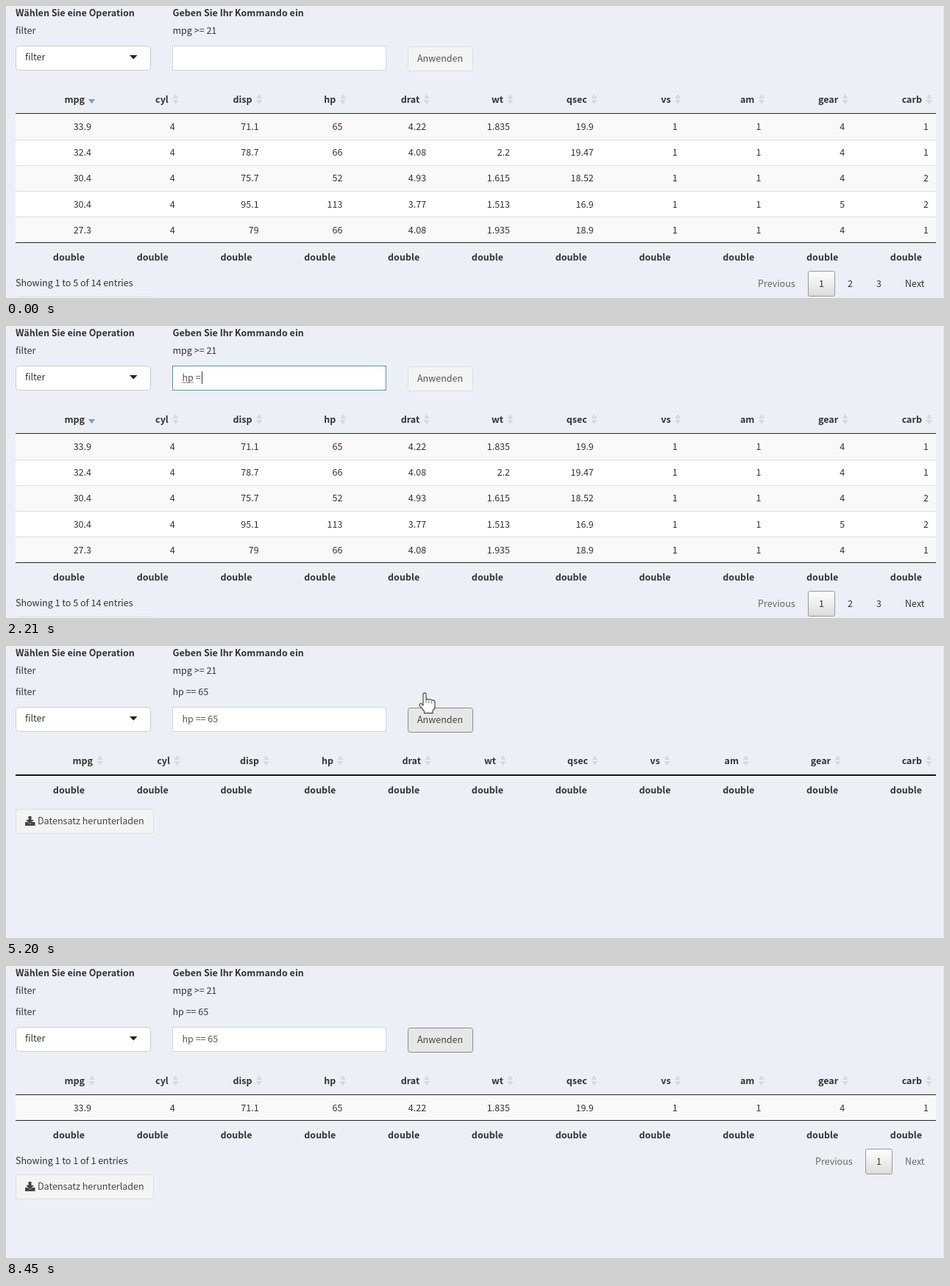
Write an HTML page that moves like this. It is 1275 by 398 pixels and loops after 8.58 s.

```html
<!DOCTYPE html>
<html lang="de">
<head>
<meta charset="utf-8">
<title>Tabelle filtern</title>
<style>
  html, body { margin: 0; width: 100%; height: 100%; overflow: hidden; background: #ecf0f6; }
  svg { display: block; }
  text {
    font: 12.53px "Noto Sans CJK JP", "Noto Sans CJK SC", "Noto Sans CJK", "Open Sans", sans-serif;
    fill: #333; white-space: pre;
  }
  .b { font-weight: bold; }
  .e { text-anchor: end; }
  .m { text-anchor: middle; }
</style>
</head>
<body>
<svg id="stage" width="1275" height="398" viewBox="0 0 1275 398"></svg>
<script>
const LOOP = 8580, STEP = 130;
const stage = document.getElementById('stage');
const pen = document.createElement('canvas').getContext('2d');

const names = 'mpg cyl disp hp drat wt qsec vs am gear carb'.split(' ');
const rows = [
  '33.9 4 71.1 65 4.22 1.835 19.9 1 1 4 1',
  '32.4 4 78.7 66 4.08 2.2 19.47 1 1 4 1',
  '30.4 4 75.7 52 4.93 1.615 18.52 1 1 4 2',
  '30.4 4 95.1 113 3.77 1.513 16.9 1 1 5 2',
  '27.3 4 79 66 4.08 1.935 18.9 1 1 4 1'
].map(row => row.split(' '));
const columnEnd = i => 107 + 113.8 * i;
const emptyHeaderEnds = [118, 223, 344, 445, 564, 666, 791, 889, 996, 1121, 1245];

// Text in the command field, from each time on
const typing = [[0, ''], [1430, 'h'], [1820, 'hp'], [2080, 'hp '], [2210, 'hp ='],
  [2470, 'hp =='], [3250, 'hp == 6'], [3640, 'hp == 65']];

// Pointer: time, x, y, shape
const pointer = [
  [0, 0, 0, ''], [130, 600, 330, 'arrow'], [780, 420, 84, 'beam'], [910, 400, 72, 'beam'],
  [1430, 400, 72, ''], [4160, 470, 66, 'beam'], [4290, 547, 43, 'arrow'], [4420, 569, 64, 'hand'],
  [6240, 569, 64, 'arrow'], [6370, 566, 68, 'arrow'], [6890, 566, 68, 'arrow'],
  [7280, 445, 158, 'hand'], [7410, 435, 182, 'hand'], [7540, 438, 192, 'arrow'],
  [7800, 450, 205, 'arrow'], [7930, 450, 220, 'arrow'], [8320, 470, 385, 'arrow'], [8450, 0, 0, '']
];

const text = (x, y, str, cls = '', fill = '') =>
  `<text x="${x}" y="${y}" class="${cls}"${fill && ` style="fill:${fill}"`}>${str.replace('>', '&gt;')}</text>`;
const rect = (x, y, w, h, fill) =>
  `<rect x="${x}" y="${y}" width="${w}" height="${h}" fill="${fill}"/>`;
const box = (x, y, w, h, fill, stroke, r = 0) =>
  `<rect x="${x + .5}" y="${y + .5}" width="${w - 1}" height="${h - 1}" rx="${r}" fill="${fill}" stroke="${stroke}"/>`;
const path = (d, fill, more = '') => `<path d="${d}" fill="${fill}" ${more}/>`;
const line = (y, color, h = 1) => rect(13, y, 1251, h, color);
const lastBefore = (list, t) => list.filter(item => item[0] <= t).pop();

function sortIcon(x, y, sorted) {
  const down = (w, top) => `M${x - w} ${top}h${2 * w}l${-w} 6z`;
  return sorted ? path(down(4.5, y), '#6ba6c6')
    : path(`M${x - 4} ${y - 1}h8l-4 -6z` + down(4, y + 1), '#d6d9de');
}

function header(y, ends, sorted) {
  return names.map((name, i) => {
    const end = ends ? ends[i] : columnEnd(i);
    return text(end, y, name, 'b e') + sortIcon(end + 9.5, y - 5, sorted && i === 0);
  }).join('');
}

const footer = y => names.map((_, i) => text(columnEnd(i), y, 'double', 'b e')).join('');
const cells = (row, y) => row.map((value, i) => text(columnEnd(i) + 9, y, value, 'e')).join('');

function pager(y, pages, prevX, firstX) {
  let out = text(prevX, y + 22, 'Previous', '', '#666') + box(firstX - 18, y, 37, 35, 'url(#page)', '#979797', 2);
  for (let i = 0; i < pages; i++) out += text(firstX + .5 + 39 * i, y + 22, String(i + 1), 'm');
  return out + text(1222, y + 22, 'Next', '', pages > 1 ? '#333' : '#666');
}

function download(y) {
  return box(13, y, 188, 34, '#f4f4f4', '#ddd', 3)
    + path(`M30.5 ${y + 10}h4v5h3.5l-5.5 5.5l-5.5 -5.5h3.5zM26 ${y + 18}h3.5l3 3l3 -3h4v5h-13.5z`, '#444')
    + text(43, y + 21, 'Datensatz herunterladen', '', '#444');
}

function fullTable() {
  let out = header(132, null, true);
  rows.forEach((row, i) => {
    const y = Math.round(147 + 35.1 * i);
    out += rect(13, y, 1251, 35, i % 2 ? '#fff' : '#f9f9f9');
    if (i) out += line(y, '#ddd');
    out += cells(row, 169 + Math.round(35.2 * i));
  });
  return out + line(146, '#222') + line(322, '#222') + footer(347)
    + text(13, 382, 'Showing 1 to 5 of 14 entries') + pager(361, 3, 1022, 1108) + download(396);
}

const emptyTable = () =>
  header(161, emptyHeaderEnds) + line(175, '#111', 2) + footer(201) + download(222);

const resultTable = hover =>
  header(161) + rect(13, 176, 1251, 34, hover ? '#f5f5f5' : '#f9f9f9') + cells(rows[0], 198)
  + line(175, '#222') + line(210, '#222') + footer(235)
  + text(13, 270, 'Showing 1 to 1 of 1 entries') + pager(249, 1, 1100, 1186) + download(284);

function commandField(t, y, focused) {
  const [since, value] = lastBefore(typing, t);
  const width = pen.measureText(value).width;
  let out = box(226, y, 291, 34, '#fff', focused ? '#4f97bd' : '#d2d6de')
    + text(239.5, y + 21, value, '', t >= 1430 && t < 1820 ? '#888' : '#555');
  if (focused) {
    if (t >= 1950) out += path(`M239 ${y + 24}` + 'l2 -2l2 2'.repeat(4), 'none', 'stroke="#d06a60" stroke-width=".9"');
    const blinkStart = Math.max(since, 1040);
    if ((t - blinkStart) % 1060 < 390) out += rect(Math.round(239.5 + width), y + 8, 1, 17, '#333');
  }
  return out;
}

function form(t) {
  const applied = t >= 5070, shift = applied ? 29 : 0, y = 54 + shift;
  const pressed = t >= 4940, hovered = t >= 4420;
  let out = text(13, 14, 'Wählen Sie eine Operation', 'b') + text(226.5, 14, 'Geben Sie Ihr Kommando ein', 'b')
    + text(13, 38, 'filter') + text(226.5, 38, 'mpg >= 21');
  if (applied) out += text(13, 67, 'filter') + text(226.5, 67, 'hp == 65');
  return out + box(13, y, 184, 34, '#fff', '#ccc', 4) + text(26, y + 20, 'filter')
    + path(`M168 ${y + 13}h10.5l-5.25 5.5z`, '#222')
    + commandField(t, y, t >= 1040 && !pressed)
    + box(546, y + 1, 89, 34, hovered ? '#e7e7e7' : '#f4f4f4', pressed ? '#8c8c8c' : hovered ? '#adadad' : '#ddd', 3)
    + text(559, y + 22, 'Anwenden', '', pressed ? '#444' : '#555');
}

const shapes = {
  arrow: path('M0 0V20.5L4.6 16.4L8 24.5L11.4 23L8 15.2H14.2Z', '#fff', 'stroke="#555" stroke-width="1.2"'),
  beam: path('M-4 -9h3l1 1l1 -1h3M0 -8v16M-4 9h3l1 -1l1 1h3', 'none', 'stroke="#444" stroke-width="1.2"'),
  hand: path('M-2 2Q-2 0 0 0T2 2V9Q3 7.5 5.5 9Q8 8 9.5 10Q13 9 14 12V18Q14 22 11 24V27.5H-.5V25L-7 17Q-7 14 -4.5 14.5L-2 17Z',
    '#fff', 'stroke="#555" stroke-width="1.3" stroke-linejoin="round"')
    + path('M2 9V14M5.8 9.5V14M9.6 10.5V14.5', 'none', 'stroke="#777"')
};

function cursor(t) {
  const from = lastBefore(pointer, t), to = pointer[pointer.indexOf(from) + 1];
  const shape = from[3];
  if (!shape) return '';
  const k = to[3] ? (t - from[0]) / (to[0] - from[0]) : 0;
  const at = i => from[i] + (to[i] - from[i]) * k;
  return `<g transform="translate(${at(1)} ${at(2)})">${shapes[shape]}</g>`;
}

const defs = `<defs><linearGradient id="page" x2="0" y2="1"><stop stop-color="#fff"/>
  <stop offset="1" stop-color="#dcdcdc"/></linearGradient></defs>`;

function render(t) {
  const table = t < 5070 ? fullTable() : t < 5330 ? emptyTable() : resultTable(t >= 7410 && t < 7930);
  pen.font = getComputedStyle(stage.querySelector('text') || document.body).font;
  stage.innerHTML = defs + rect(0, 0, 1275, 398, '#ecf0f6') + rect(1274, 0, 1, 398, '#e2e6ed')
    + form(t) + table + cursor(t);
}

let shown = -1;
const start = performance.now();
function tick() {
  const t = Math.floor((performance.now() - start) % LOOP / STEP) * STEP;
  if (t !== shown) render(shown = t);
  requestAnimationFrame(tick);
}
tick();
</script>
</body>
</html>
```
